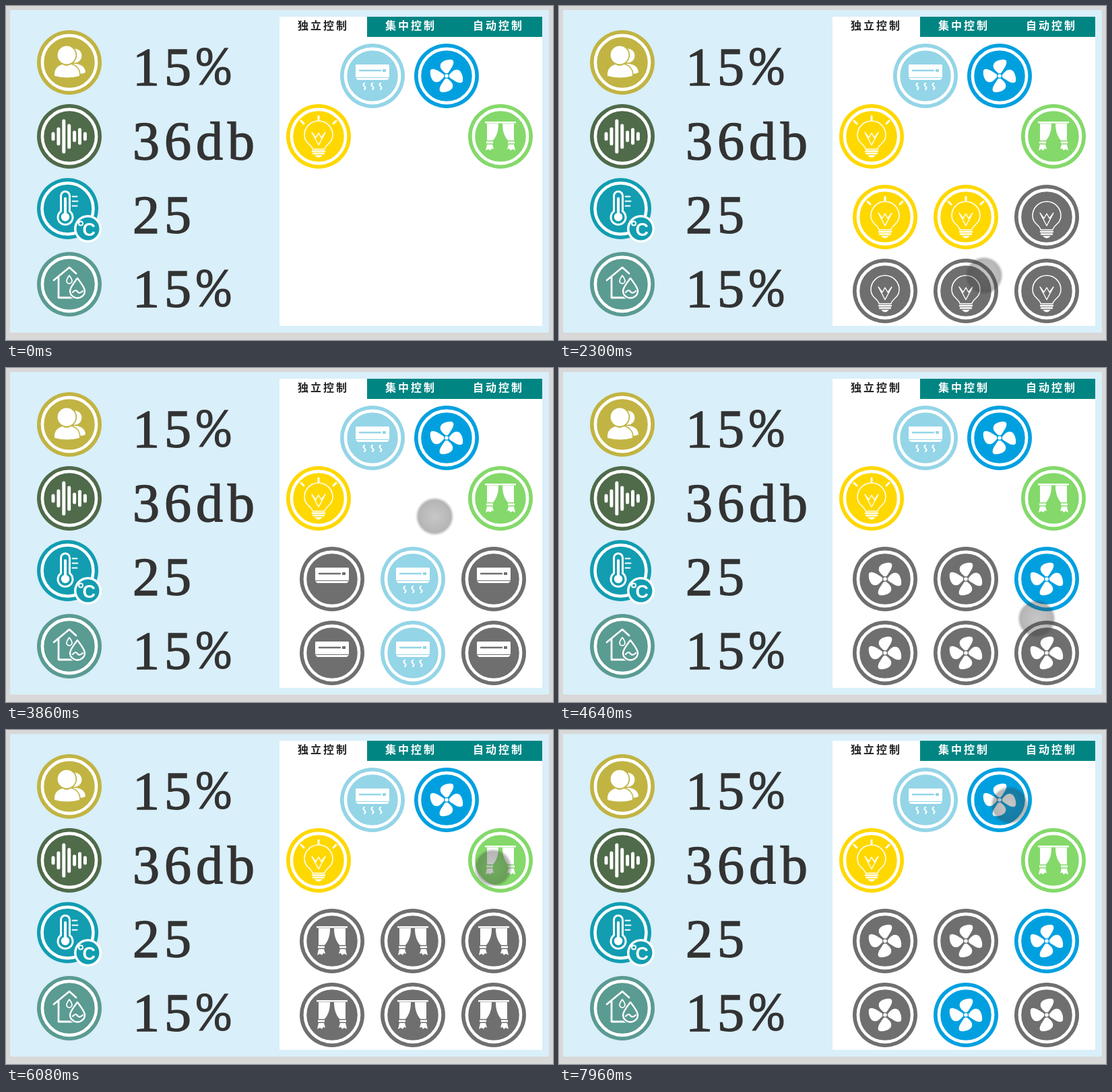
Write an HTML page with a canvas that moves like this. It is 812 by 497 pixels and loops after 8000 ms.

```html
<!DOCTYPE html>
<html lang="zh">
<head>
<meta charset="utf-8">
<title>Room control</title>
<style>
html, body { margin: 0; width: 100%; height: 100%; overflow: hidden; background: #d8d8d8; }
canvas { display: block; }
</style>
</head>
<body>
<canvas id="stage" width="812" height="497"></canvas>
<script>
const ctx = document.getElementById('stage').getContext('2d');
const LOOP = 8000, TICK = 111, LEAD = 180;
const GRAY = '#6f6f6f', WHITE = '#fff', INK = '#333';
const CJK = '"Noto Sans CJK SC", "Noto Sans CJK", sans-serif';

function disc(x, y, r, color = WHITE) {
  ctx.fillStyle = color;
  ctx.beginPath();
  ctx.arc(x, y, r, 0, 7);
  ctx.fill();
}

function ring(x, y, r, width) {
  ctx.strokeStyle = WHITE;
  ctx.lineWidth = width;
  ctx.beginPath();
  ctx.arc(x, y, r, 0, 7);
  ctx.stroke();
}

function rect(x, y, w, h, color = WHITE) {
  ctx.fillStyle = color;
  ctx.fillRect(x, y, w, h);
}

function fill(path, color = WHITE) {
  ctx.fillStyle = color;
  ctx.fill(new Path2D(path));
}

function line(path, width, color = WHITE) {
  ctx.strokeStyle = color;
  ctx.lineWidth = width;
  ctx.stroke(new Path2D(path));
}

// weight thickens the strokes of the letters
function text(str, x, y, font, color, spacing = 0, weight = 0) {
  ctx.font = font;
  ctx.fillStyle = ctx.strokeStyle = color;
  ctx.letterSpacing = spacing + 'px';
  ctx.fillText(str, x, y);
  if (weight) {
    ctx.lineWidth = weight;
    ctx.strokeText(str, x, y);
  }
}

// Icons are drawn around their own centre.
function people(color) {
  disc(8, -10, 10.5);
  fill('M6 2C18 1 24 8 24 15Q18 18 8 17Z');
  disc(-4, -11, 15.2, color);
  disc(-4, -11, 13.4);
  const body = 'M-22 20C-23 8 -15 4 -10 3Q-4 7 2 3C8 4 16 9 15 20Q-3 25 -22 20Z';
  line(body, 3, color);
  fill(body);
}

function sound() {
  [7, 14, 26, 19, 9, 13, 7].forEach((h, i) =>
    line(`M${-24 + i * 7.9} ${3 - h}V${h - 3}`, 5));
}

function thermometer(color) {
  line('M-10 4V-19A6.5 6.5 0 0 1 3 -19V4A11 11 0 1 1 -10 4Z', 3);
  line('M-3.5 -15V8', 4);
  disc(-3.5, 12.5, 6.2);
  line('M7 -18H14M7 -11H15M7 -4H14', 2);
  disc(30, 30, 20.5);
  disc(30, 30, 17, color);
  ring(19.5, 22, 3, 2);
  text('C', 22, 40, 'bold 27px "Liberation Sans", sans-serif', WHITE);
}

function house(color) {
  line('M-23 -6L0 -25L10 -16M-16 -11V20H7', 2.8);
  line('M0 -13C3 -9 4 -7 4 -5A4 4 0 0 1 -4 -5C-4 -7 -3 -9 0 -13Z', 1.8);
  const drop = 'M12 -9C18 -1 23 5 23 10A11 10.5 0 0 1 1 10C1 5 6 -1 12 -9Z';
  line(drop, 5, color);
  fill(drop, color);
  line(drop, 2.4);
  line('M5 12Q9 7 12 11T20 10', 2.2);
}

function bulb(color, lit) {
  line('M-9 19C-10 12 -21 10 -21 -2A21 21 0 0 1 21 -2C21 10 10 12 9 19Z', 1.5);
  line('M-10 -6L0 13L10 -6L4 2L0 -5L-4 2Z', 1.4);
  line('M-9 22H9M-8 25.5H8', 2.4);
  fill('M-6 28H6Q3 31.5 0 31.5T-6 28Z');
  if (lit) line('M0 -30V-25M-26 -23L-22 -19M26 -23L22 -19', 3);
}

function aircon(color, lit) {
  fill('M-24 -17H24Q25 -17 25 -15V2H-25V-15Q-25 -17 -24 -17Z');
  fill('M-25 3H25L22 6H-22Z');
  line('M-19 -8H12', 2.4, color);
  rect(15, -10, 5, 4, color);
  if (lit) {
    for (const x of [-12, 0, 12]) line(`M${x} 11q-3 2 0 4.5t0 4.5`, 2.2);
  }
}

function fan(color) {
  for (let i = 0; i < 4; i++) {
    fill('M0 -2C-4 -7 -11 -10 -9 -17C-7 -23 3 -25 8 -24C13 -22 9 -14 6 -10Q4 -6 0 -2Z');
    ctx.rotate(Math.PI / 2);
  }
  disc(0, 0, 4, color);
  disc(0, 0, 2.8);
}

function curtain() {
  rect(-23, -22, 46, 2.5);
  for (const side of [1, -1]) {
    ctx.save();
    ctx.scale(side, 1);
    fill('M-20 -19H-3C-3 -7 -6 0 -11 6H-20Z');
    fill('M-21 7.5H-11V10.5H-21Z');
    fill('M-20 12H-12L-10 19L-13 18L-15 21L-18 19L-22 21Z');
    ctx.restore();
  }
}

function badge(x, y, color, glyph, lit, r = 48) {
  ctx.save();
  ctx.translate(x, y);
  ctx.lineCap = ctx.lineJoin = 'round';
  disc(0, 0, r, color);
  ring(0, 0, r * 0.835, 4.6);
  glyph(color, lit);
  ctx.restore();
}

const devices = {
  light: { x: 464, y: 194, color: '#ffd800', glyph: bulb },
  air: { x: 544, y: 104, color: '#94d5e7', glyph: aircon },
  fan: { x: 654, y: 104, color: '#00a0e0', glyph: fan },
  curtain: { x: 734, y: 194, color: '#84d96a', glyph: curtain }
};

const cell = i => ({ x: 484 + i % 3 * 120, y: 314 + Math.floor(i / 3) * 110 });

// What is pressed, and when: a device opens its page, a number lights that cell.
const presses = [
  ['light', 5], [0, 10], [1, 14], ['air', 23], [1, 27], [4, 30], ['fan', 35],
  [2, 39], [4, 43], ['curtain', 51], [5, 57], [0, 62], ['fan', 68]
].map(([target, tick]) => ({ target, tick, ...(devices[target] || cell(target)) }));

// The pointer rests a little off each pressed centre and swerves between some of them.
const stops = [
  { tick: 0, x: 619, y: 337 },
  { tick: 3, x: 464, y: 189 },
  ...presses.map(p => ({ tick: p.tick, x: p.x, y: p.y + (p.target in devices ? 0 : 12) })),
  { tick: 19, x: 631, y: 401 },
  { tick: 40, x: 709, y: 373 },
  { tick: 53, x: 723, y: 205 },
  { tick: 70, x: 669, y: 112 }
].sort((a, b) => a.tick - b.tick);

function pointerAt(k) {
  const i = Math.max(1, stops.findIndex(s => s.tick >= k));
  const a = stops[i - 1], b = stops[i];
  const u = (k - a.tick) / (b.tick - a.tick);
  const ease = u * u * (3 - 2 * u);
  return [a.x + (b.x - a.x) * ease, a.y + (b.y - a.y) * ease];
}

function drawPointer(k) {
  const [x, y] = pointerAt(k);
  const shade = ctx.createRadialGradient(x, y, 0, x, y, 29);
  shade.addColorStop(0, 'rgba(70,70,70,.3)');
  shade.addColorStop(0.84, 'rgba(60,60,60,.38)');
  shade.addColorStop(0.9, 'rgba(60,60,60,.2)');
  shade.addColorStop(1, 'rgba(60,60,60,0)');
  disc(x, y, 29, shade);
  if (presses.some(p => p.tick === k)) disc(x, y, 12, 'rgba(212,212,30,.75)');
}

function reading(str, y) {
  const digits = str.replace('%', '');
  text(digits, 188, y, '80px "Liberation Serif", serif', INK, 7, 1.5);
  if (digits !== str) text('%', 283, y, '84px "Liberation Mono", monospace', INK);
}

function drawSensors() {
  badge(94, 84, '#c1b443', people);
  badge(94, 194, '#4f6b4a', sound);
  badge(91.5, 301.5, '#129db1', thermometer, false, 45.5);
  badge(94, 414, '#5a9b92', house);
  ['15%', '36db', '25', '15%'].forEach((s, i) => reading(s, 118 + i * 110));
}

function drawTabs() {
  rect(406, 16, 390, 460);
  rect(536, 16, 260, 30, '#008583');
  ['独立控制', '集中控制', '自动控制'].forEach((s, i) =>
    text(s, 433 + i * 130, 35, '900 16px ' + CJK, i ? WHITE : '#222', 3));
}

// Replays the presses so far; each takes effect one tick later.
function drawGrid(k) {
  let page;
  const lit = new Set();
  for (const { target, tick } of presses) {
    if (tick >= k) break;
    if (target in devices) page = target;
    else lit.add(page + target);
  }
  if (!page) return;
  const { color, glyph } = devices[page];
  for (let i = 0; i < 6; i++) {
    const { x, y } = cell(i), on = lit.has(page + i);
    badge(x, y, on ? color : GRAY, glyph, on);
  }
}

function draw(t) {
  const k = Math.floor((t - LEAD) / TICK);
  rect(0, 0, 812, 497, '#d8d8d8');
  rect(6, 6, 800, 480, '#d9eff9');
  drawSensors();
  drawTabs();
  for (const d of Object.values(devices)) badge(d.x, d.y, d.color, d.glyph, true);
  drawGrid(k);
  if (k >= 0) drawPointer(k);
}

function frame() {
  draw(performance.now() % LOOP);
  requestAnimationFrame(frame);
}
frame();
</script>
</body>
</html>
```
